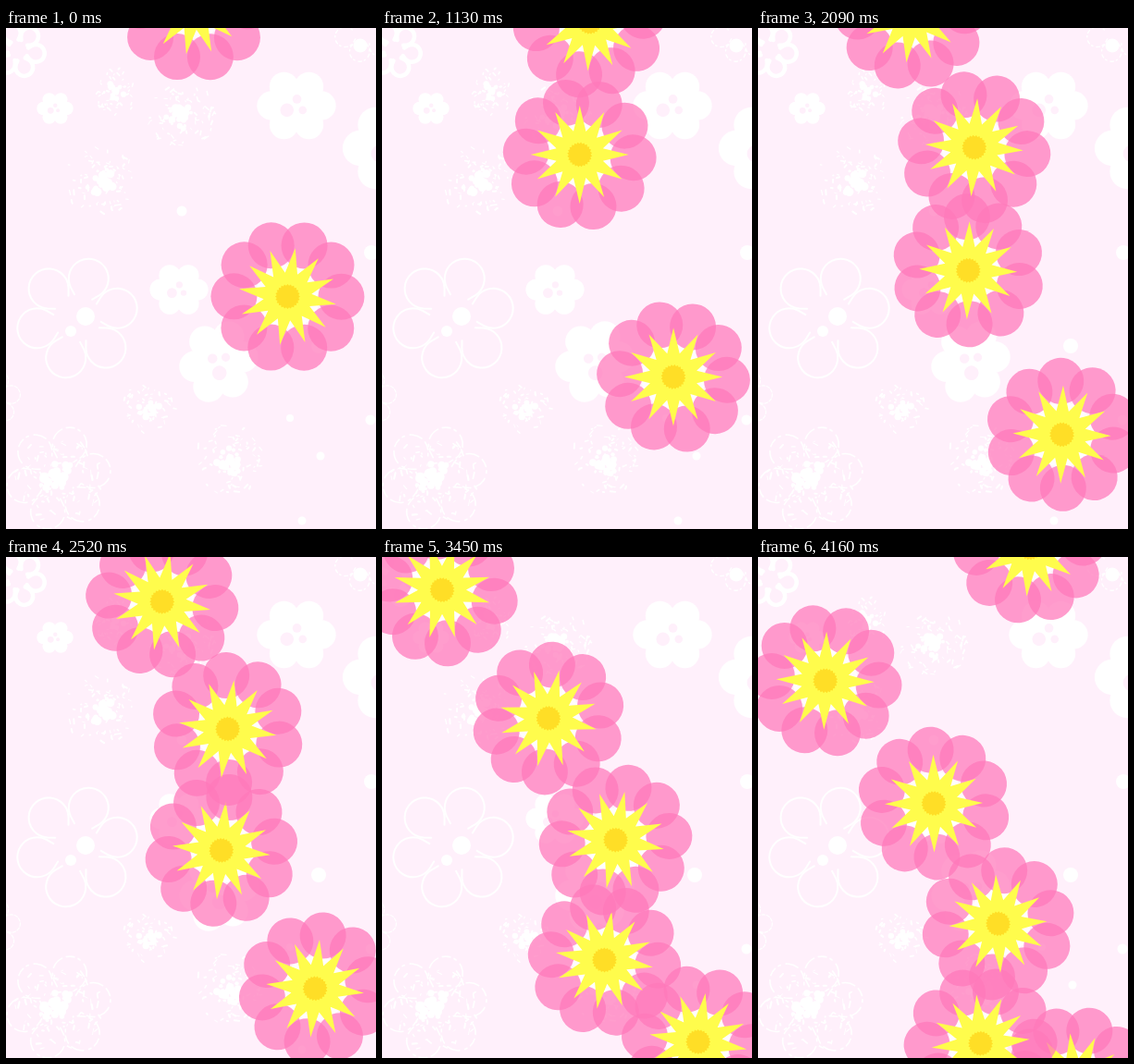
Write an HTML page with a canvas that moves like this. It is 400x542 px and loops after 4310 ms.

```html
<!DOCTYPE html>
<html lang="en">
<head>
<meta charset="utf-8">
<title>Falling flowers</title>
<style>
  html, body { margin: 0; width: 100%; height: 100%; overflow: hidden; background: #fff0fb; }
  canvas { display: block; width: 400px; height: 542px; }
</style>
</head>
<body>
<canvas id="stage" width="400" height="542"></canvas>
<script>
const W = 400, H = 542, BG = '#fff0fb', TAU = Math.PI * 2;

// How long each pose is held, in ms.
const HOLDS = [130, 150, 150, 120, 120, 160, 150, 150, 130, 120, 120, 150, 130, 150, 160, 150,
  150, 130, 150, 120, 120, 120, 150, 120, 150, 150, 130, 150, 150, 130, 150];
const LOOP = HOLDS.reduce((sum, ms) => sum + ms);

// One slow flower starts low; the others enter at the top, one per INTERVAL seconds.
const INTERVAL = 1.018, ENTRY_Y = -45, SPIN = -61;
const FLOWERS = [
  { x: 323, y: 290.5, fall: 61.5, born: 0 },
  ...[221.7, 242.5, 184, 81, 312].map((x, i) => ({ x, y: -24, fall: 127, born: i * INTERVAL }))
];

const ctx = document.getElementById('stage').getContext('2d');
const rad = deg => deg * Math.PI / 180;
// Degrees run clockwise from straight up.
const polar = (r, deg) => [r * Math.sin(rad(deg)), -r * Math.cos(rad(deg))];

function disc(c, x, y, r, color) {
  c.fillStyle = color;
  c.beginPath();
  c.arc(x, y, r, 0, TAU);
  c.fill();
}

function seeded(seed) {
  return () => (seed = seed * 16807 % 2147483647) / 2147483647;
}

function solidBloom(c, x, y, size, turn = 0) {
  c.save();
  c.translate(x, y);
  c.rotate(rad(turn));
  for (let i = 0; i < 6; i++) {
    const [dx, dy] = polar(size, 30 + i * 60);
    disc(c, dx, dy * .88, size * .58, '#fff');
  }
  disc(c, 0, 0, size * .75, '#fff');
  disc(c, -.38 * size, .18 * size, .27 * size, BG);
  disc(c, .02 * size, -.26 * size, .18 * size, BG);
  disc(c, .25 * size, .18 * size, .16 * size, BG);
  c.restore();
}

function outlineBloom(c, x, y, size, turn, width, dash = []) {
  c.save();
  c.translate(x, y);
  c.scale(size, size);
  c.rotate(rad(turn));
  c.strokeStyle = '#fff';
  c.lineWidth = width / size;
  c.lineJoin = c.lineCap = 'round';
  c.setLineDash(dash);
  for (let i = 0; i < 6; i++) {
    c.beginPath();
    c.moveTo(-10, -24);
    c.arc(0, -44.5, 21.5, rad(138), rad(402));
    c.lineTo(10, -24);
    c.stroke();
    c.rotate(TAU / 6);
  }
  c.restore();
}

// Worn, speckled blossom: a ragged core with loose flecks around it.
function splat(c, x, y, reach) {
  const rnd = seeded(x * 31 + y), core = reach * .42;
  for (let i = 0; i < core * 2; i++) {
    const [dx, dy] = polar(core * rnd(), rnd() * 360);
    disc(c, x + dx, y + dy, 1 + rnd() * core * .24, '#fff');
  }
  c.strokeStyle = '#fff';
  c.lineCap = 'round';
  for (let i = 0; i < reach * 1.8; i++) {
    const a = rnd() * 360, r = reach * (.35 + .65 * rnd());
    const [px, py] = polar(r, a);
    const [qx, qy] = polar(r + (rnd() - .5) * 6, a + (rnd() - .5) * 18);
    c.lineWidth = .8 + rnd() * 1.4;
    c.beginPath();
    c.moveTo(x + px, y + py);
    c.lineTo(x + qx, y + qy);
    c.stroke();
  }
}

function makeBackdrop() {
  const cv = document.createElement('canvas');
  cv.width = W;
  cv.height = H;
  const c = cv.getContext('2d');
  c.fillStyle = BG;
  c.fillRect(0, 0, W, H);

  solidBloom(c, 53, 87, 12.5);
  solidBloom(c, 314, 84, 27);
  solidBloom(c, 187, 283, 20);
  solidBloom(c, 230, 361, 29, -68);
  solidBloom(c, 416, 130, 33);

  outlineBloom(c, 77, 314, 1, 16, 2);
  disc(c, 86, 312, 10, '#fff');
  disc(c, 70, 328, 6, '#fff');
  outlineBloom(c, 13, 24, .44, 40, 4.5);
  outlineBloom(c, 57, 487, .86, 18, 1.6, [10, 5, 3, 7, 16, 6]);
  outlineBloom(c, 388, 4, .5, 15, 1.4, [7, 8, 3, 6]);
  outlineBloom(c, -14, 400, .45, 20, 1.2, [8, 4]);

  const splats = [[119, 68, 25], [189, 94, 38], [102, 166, 38], [154, 410, 28], [243, 468, 38], [57, 488, 48]];
  for (const spot of splats) splat(c, ...spot);
  const dots = [[190, 198, 5.5], [383, 19, 7.5], [340, 463, 4.5], [394, 424, 5.5],
    [307, 422, 4], [320, 533, 4.5], [338, 344, 8], [395, 243, 8]];
  for (const dot of dots) disc(c, ...dot, '#fff');
  return cv;
}

function drawFlower(x, y, turn) {
  ctx.save();
  ctx.translate(x, y);
  ctx.rotate(rad(turn));
  disc(ctx, 0, 0, 35, 'rgba(255,255,255,.8)');
  for (let i = 0; i < 10; i++) disc(ctx, ...polar(58, 18.2 + i * 36), 25, 'rgba(255,121,187,.73)');
  star(12, 53, 26, 9, '#fffc4c');
  star(24, 13.5, 11.8, 0, '#ffde26');
  ctx.restore();
}

function star(points, outer, inner, turn, color) {
  ctx.fillStyle = color;
  ctx.beginPath();
  for (let i = 0; i < points * 2; i++) ctx.lineTo(...polar(i % 2 ? inner : outer, turn + i * 180 / points));
  ctx.fill();
}

// Steady fall with a quick start, swaying sideways.
function place({ x, y, fall }, age) {
  return [
    x + 19.5 * Math.sin(.74 * (age - 1.7)),
    y + fall * age + 22 * (1 - Math.exp(-1.4 * age))
  ];
}

// Start of the pose held at the given moment.
function poseTime(ms) {
  let t = 0;
  for (const hold of HOLDS) {
    if (ms < t + hold) break;
    t += hold;
  }
  return t;
}

const backdrop = makeBackdrop();
const start = performance.now();

function render(now) {
  const t = poseTime(Math.max(0, now - start) % LOOP) / 1000;
  ctx.drawImage(backdrop, 0, 0);
  for (const flower of FLOWERS) {
    const age = t - flower.born;
    const [x, y] = place(flower, age);
    if (y > ENTRY_Y) drawFlower(x, y, SPIN * age);
  }
  requestAnimationFrame(render);
}
render(start);
</script>
</body>
</html>
```
